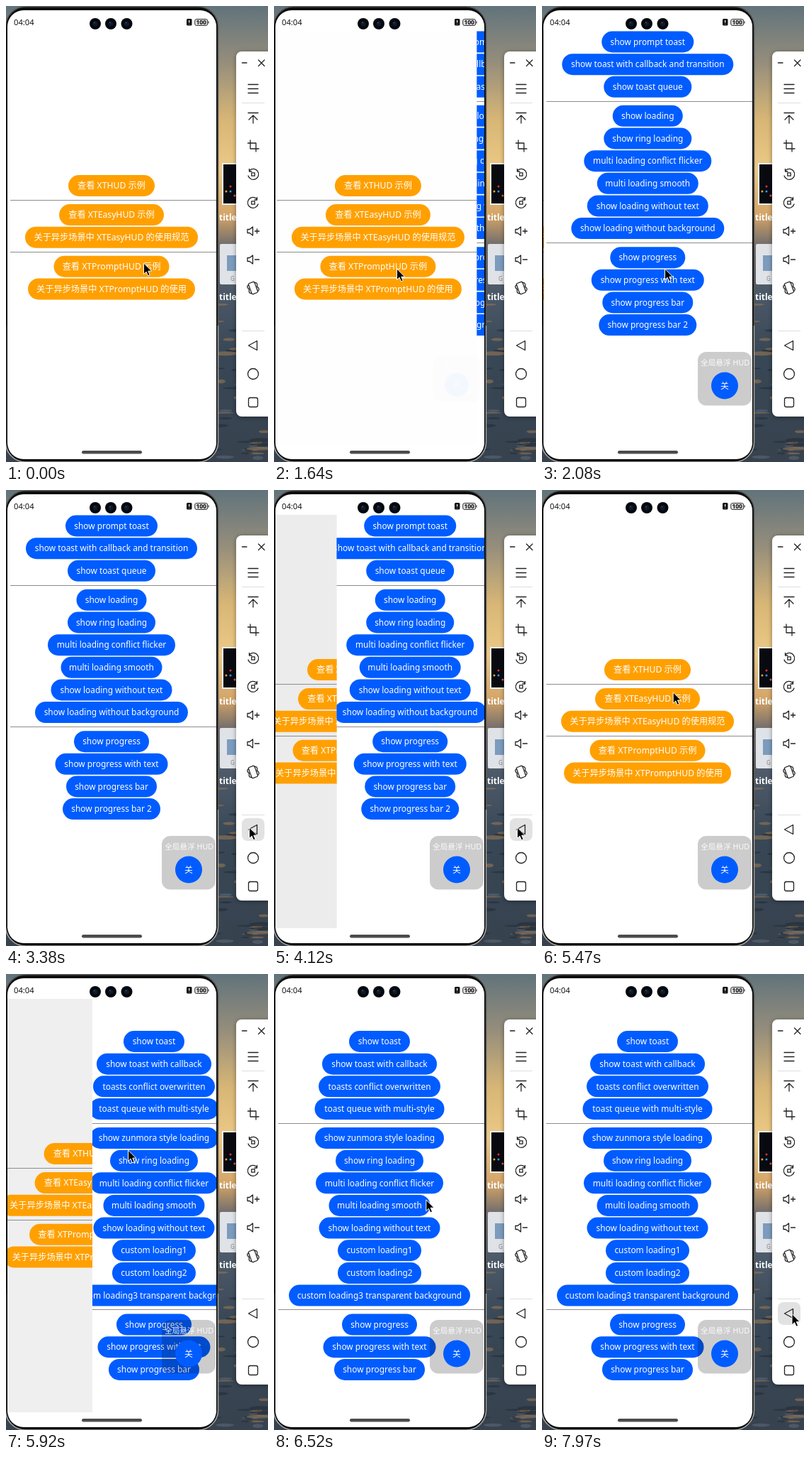
An HTML page for the animation above (8 s loop, 370x642 px).

```html
<!DOCTYPE html>
<html lang="zh">
<head>
<meta charset="utf-8">
<style>
html, body { margin: 0; width: 100%; height: 100%; overflow: hidden; }
svg { display: block; }
text { font: 500 11.9px "Noto Sans", "Noto Sans CJK SC", "Noto Sans CJK", sans-serif; fill: #fff; text-anchor: middle; }
.icon { fill: none; stroke: #222; stroke-width: 1.3; stroke-linecap: round; stroke-linejoin: round; }
.start { text-anchor: start; }
</style>
</head>
<body>
<svg width="370" height="642" viewBox="0 0 370 642">
  <defs>
    <linearGradient id="sky" x2="0" y2="1">
      <stop offset="0" stop-color="#61737b"/>
      <stop offset=".12" stop-color="#948d7c"/>
      <stop offset=".25" stop-color="#d8b676"/>
      <stop offset=".36" stop-color="#ecc985"/>
      <stop offset=".46" stop-color="#d3a468"/>
      <stop offset=".52" stop-color="#77706c"/>
      <stop offset=".62" stop-color="#4d5a69"/>
      <stop offset=".76" stop-color="#384756"/>
      <stop offset="1" stop-color="#37424e"/>
    </linearGradient>
    <linearGradient id="metal" x2="0" y2="1">
      <stop offset=".7" stop-color="#555"/>
      <stop offset=".7" stop-color="#a4a4a4"/>
    </linearGradient>
    <filter id="shade" x="-30%" y="-5%" width="160%" height="110%">
      <feDropShadow dx="0" dy="1" stdDeviation="3" flood-opacity=".4"/>
    </filter>
  </defs>

  <!-- desktop -->
  <rect width="370" height="642" fill="url(#sky)"/>
  <g id="waves"></g>
  <rect x="305" y="221" width="30" height="59" fill="#eee"/>
  <rect x="307" y="223" width="28" height="55" fill="#080a10"/>
  <circle cx="317" cy="254" r="1.5" fill="#e33"/>
  <circle cx="311" cy="261" r="1.5" fill="#e8a020"/>
  <circle cx="317" cy="261" r="1.5" fill="#39f"/>
  <circle cx="323" cy="267" r="1.5" fill="#e55"/>
  <rect x="302" y="335" width="30" height="57" rx="2" fill="#dfe3e8"/>
  <path d="M312 351h20v22h-20z" fill="#7d9cbd"/>
  <text class="start" x="317" y="387" style="font-size:8px;fill:#888">G</text>
  <text class="start" x="301" y="302" style="font-weight:700">title</text>
  <text class="start" x="301" y="414" style="font-weight:700">title</text>

  <!-- phone -->
  <rect x="-.5" y="1" width="300" height="641" rx="28" fill="#0c0c0c" stroke="url(#metal)" stroke-width="1.5"/>
  <rect x="2" y="6" width="295" height="632" rx="23" fill="#fff"/>
  <text class="start" x="11" y="27" style="font-size:11.2px;fill:#111">04:04</text>
  <g id="cams"></g>
  <rect x="255" y="18" width="7.5" height="9.5" rx="1.5" fill="#111"/>
  <path d="M258.7 20v3.5M258.7 25v.6" stroke="#fff" stroke-width="1.2"/>
  <rect x="266.7" y="18.5" width="18" height="9" rx="2.5" fill="#ddd" stroke="#333"/>
  <path d="M286 21.5v3" stroke="#333" stroke-width="1.2"/>
  <text x="275.7" y="26.2" style="font-size:8.5px;font-weight:700;fill:#111">100</text>
  <svg x="2" y="35" width="295" height="582">
    <rect id="dim" width="295" height="582"/>
    <g id="home"></g>
  </svg>
  <svg id="top" y="35" height="582">
    <rect width="295" height="582" fill="#fff"/>
    <g id="pageB"></g>
    <g id="pageC"></g>
  </svg>
  <g id="hud">
    <rect x="220" y="487" width="76" height="75.5" rx="12" fill-opacity=".2"/>
    <text x="258.5" y="506" style="font-size:10.7px;fill-opacity:.92">全局悬浮 HUD</text>
    <circle cx="258" cy="534.5" r="19" fill="#005cff"/>
    <text x="258" y="538.8">关</text>
  </g>
  <rect x="107" y="626" width="85" height="4.6" rx="2.3" fill="#4c4c4c"/>

  <!-- tool panel -->
  <rect x="325" y="64" width="60" height="514" rx="8" fill="#fff" filter="url(#shade)"/>
  <rect id="hover" x="333" width="32" height="32" rx="8" fill="#e2e2e2"/>
  <path d="M333 136.5h32M333 457.5h32" stroke="#ddd"/>
  <g class="icon">
    <path d="M333.5 80h6.5M356.5 76l8.5 8.5m0-8.5l-8.5 8.5M342 110.5h14M342 116.5h14M342 122.5h14"/>
    <path d="M342 150.5h14M349 165v-11M343 160l6-6 6 6"/>
    <path d="M345 189v12h12M341.5 193h11.5v12"/>
    <path id="turn" d="M342 239a7.5 7.5 0 1 0 2-7.500M343.500 229.500v3.500h3.500M346.800 234.800h4.400v4.400h-4.400z"/>
    <use href="#turn" transform="translate(698 40) scale(-1 1)"/>
    <path id="speaker" d="M341 314.5h3l4.5-3.5v12l-4.5-3.5h-3z"/>
    <use href="#speaker" y="40"/>
    <path d="M351.5 317h6M354.5 314v6M351.5 357h6"/>
    <g transform="rotate(-20 349 397)">
      <rect x="344.5" y="389" width="9" height="16" rx="1.5"/>
      <path d="M344.500 390.500q-3.500 1-2.500 4l1 2.500-1 2.500q-1 3 2.500 4M353.500 390.500q3.500 1 2.500 4l-1 2.500 1 2.500q1 3-2.500 4"/>
    </g>
    <path d="M342.5 478l12-6.5v13z"/>
    <circle cx="349" cy="518" r="7.5"/>
    <rect x="342.5" y="551.5" width="13" height="13" rx="2.5"/>
  </g>
  <path id="cursor" d="M0 0V15.5L3.600 12.200 6 17.800 8.700 16.700 6.300 11.200H11.200Z" stroke="#fff"/>
</svg>
<script>
const $ = id => document.getElementById(id);
const LOOP = 8000, W = 295, LEFT = 2, TOP = 35;

// Labels with pill widths; null is a divider line.
const tail = [null, ['show progress', 106], ['show progress with text', 159], ['show progress bar', 128]];
const shared = [['show ring loading', 124], ['multi loading conflict flicker', 180],
  ['multi loading smooth', 143], ['show loading without text', 171]];
const pages = {
  home: [253, '#ffa000', 12.2, [['查看 XTHUD 示例', 122], null, ['查看 XTEasyHUD 示例', 148],
    ['关于异步场景中 XTEasyHUD 的使用规范', 244], null, ['查看 XTPromptHUD 示例', 163],
    ['关于异步场景中 XTPromptHUD 的使用', 236]]],
  pageB: [50.5, '#005cff', 11.9, [['show prompt toast', 130],
    ['show toast with callback and transition', 242], ['show toast queue', 124], null,
    ['show loading', 99], ...shared, ['show loading without background', 216],
    ...tail, ['show progress bar 2', 138]]],
  pageC: [95, '#005cff', 11.9, [['show toast', 86], ['show toast with callback', 162],
    ['toasts conflict overwritten', 172], ['toast queue with multi-style', 183], null,
    ['show zunmora style loading', 182], ...shared, ['custom loading1', 118],
    ['custom loading2', 118], ['custom loading3 transparent background', 256], ...tail]]
};

for (const [id, [start, color, size, items]] of Object.entries(pages)) {
  let y = start, html = '';
  for (const item of items) {
    if (!item) {
      html += `<path d="M6 ${Math.floor(y - 11.2) + .5}H297" stroke="#8c8c8c"/>`;
      y += 9.4;
      continue;
    }
    const [label, w] = item;
    html += `<rect x="${149 - w / 2}" y="${y - 15}" width="${w}" height="30" rx="15" fill="${color}"/>
      <text x="149" y="${y + 4.2}" style="font-size:${size}px">${label}</text>`;
    y += 31.65;
  }
  $(id).innerHTML = html;
}

$('cams').innerHTML = [126, 148, 170.5].map(x => `<circle cx="${x}" cy="25" r="8" fill="#05070c"/>
  <circle cx="${x}" cy="25" r="3.5" fill="#0d1a2b"/><circle cx="${x - 1}" cy="23.5" r="1" fill="#2c4f6b"/>`).join('');

// Sea: seeded streaks, dark troughs and warm glints
let seed = 7;
const rnd = () => (seed = seed * 16807 % 2147483647) / 2147483647;
for (let i = 0, html = ''; i < 60; i++) {
  const color = ['#202a36', '#5f6c78', '#a07a52'][i % 3];
  html += `<ellipse cx="${295 + rnd() * 75}" cy="${420 + rnd() * 222}" rx="${6 + rnd() * 12}"
    ry="${1 + rnd() * 2}" fill="${color}" opacity=".55"/>`;
  $('waves').innerHTML = html;
}

const marks = [0, 150, 590, 1340, 2080, 2380, 3380, 3530, 4570, 4720, 5620, 5770, 6670, 6820, 7820, 7970, LOOP];
function hold(t) {
  const i = marks.findLastIndex(m => m <= t), a = marks[i], len = marks[i + 1] - a;
  const n = Math.round(len / 148) || 1, step = len / n;
  return a + Math.min(n - 1, Math.floor((t - a + 9) / step)) * step;
}

// Cursor path: time, x, y
const path = [[0, 194.5, 362], [150, 193, 358], [300, 186, 354], [440, 178, 362], [590, 173.5, 370],
  [2230, 173.5, 370], [2530, 192, 351], [2800, 260, 420], [3100, 345, 520], [3240, 354, 500],
  [3380, 343.5, 475], [4130, 343.5, 475], [4570, 257.5, 490], [5000, 225, 400], [5620, 172.5, 248],
  [6220, 172.5, 248], [6670, 236, 353], [7000, 300, 470], [7240, 345, 540], [7500, 366, 455],
  [7680, 356, 484], [7820, 354, 480], [7970, 353, 478.5], [LOOP, 353, 478.5]];
function cursorAt(t) {
  const i = path.findIndex(p => p[0] > t), [t0, x0, y0] = path[i - 1], [t1, x1, y1] = path[i];
  const k = (t - t0) / (t1 - t0);
  return [x0 + (x1 - x0) * k, y0 + (y1 - y0) * k];
}

const spring = ms => ms < 0 ? 1 : (1 + .0185 * ms) * Math.exp(-.0185 * ms);
const PUSH1 = 1620, POP = 4066, PUSH2 = 5812;
// 1: upper page is off to the right, 0: it covers the home page
const offset = t => t < POP ? spring(t - PUSH1) : t < PUSH2 ? 1 - spring(t - POP) : spring(t - PUSH2);

function draw(t) {
  const f = offset(t), x = LEFT + W * f;
  $('home').setAttribute('transform', `translate(${-LEFT - (1 - f) * 58} ${-TOP})`);
  $('dim').setAttribute('opacity', .105 * (1 - f));
  const top = $('top'), second = t > 5000;
  top.setAttribute('x', x);
  top.setAttribute('width', W * (1 - f));
  top.style.display = f > .999 ? 'none' : '';
  for (const [id, on] of [['pageB', !second], ['pageC', second]]) {
    $(id).style.display = on ? '' : 'none';
    $(id).setAttribute('transform', `translate(${W / 2 * f - x} ${-TOP})`);
  }

  const p = Math.max(0, Math.min(1, (t - PUSH1) / 400)), s = .87 + .13 * p;
  $('hud').setAttribute('opacity', p);
  $('hud').setAttribute('transform', `translate(258 525) scale(${s}) translate(-258 -525)`);

  const [cx, cy] = cursorAt(t);
  $('cursor').setAttribute('transform', `translate(${cx} ${cy})`);
  const row = [478, 518, 558].find(y => cx > 333 && cx < 365 && Math.abs(cy - y) < 16);
  $('hover').style.display = row ? '' : 'none';
  if (row) $('hover').setAttribute('y', row - 16);
}

const begin = performance.now();
function tick() {
  draw(hold((performance.now() - begin) % LOOP));
  requestAnimationFrame(tick);
}
tick();
</script>
</body>
</html>
```
